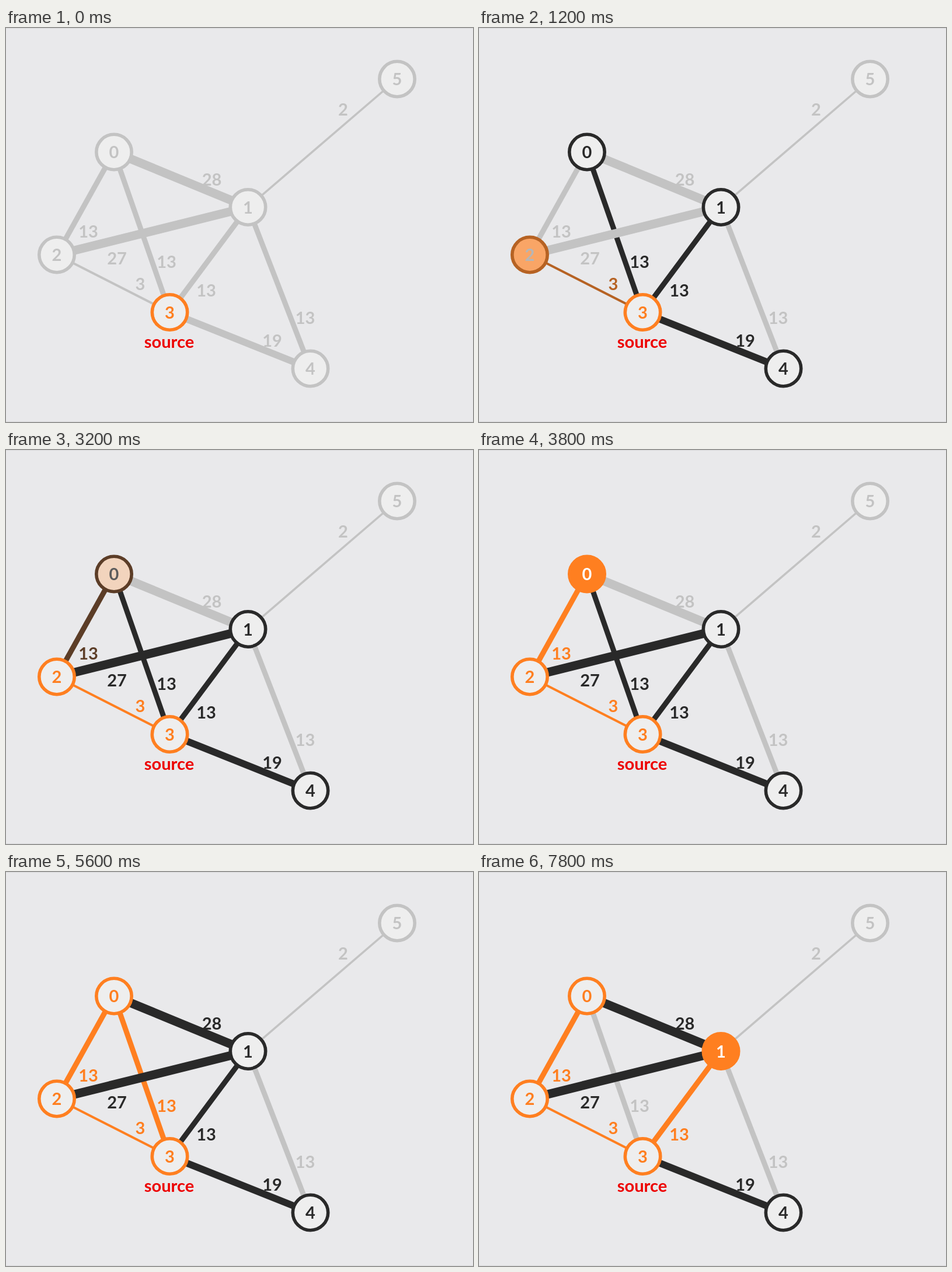
An HTML page that plays this animation: 800x675 px, repeating every 8 s.

```html
<!DOCTYPE html>
<html lang="en">
<head>
<meta charset="utf-8">
<title>Minimum spanning tree</title>
<style>
  html, body { margin: 0; width: 100%; height: 100%; overflow: hidden; background: #e9e9eb; }
  svg { display: block; width: 100vw; height: 100vh; }
  text { font: 700 29px Lato, "Open Sans", sans-serif; text-anchor: middle; }
</style>
</head>
<body>
<svg id="stage" viewBox="0 0 800 675"></svg>
<script>
const LOOP = 8000, TICK = 200, FADE = 500;
const GRAY = [195, 195, 195], DARK = [41, 41, 41], ORANGE = [255, 127, 32];
const PAPER = [238, 238, 238], WHITE = [255, 255, 255];

// Start of each step of the algorithm, in ms
const SCAN_3 = 220, TAKE_2 = 920, SCAN_2 = 2270, TAKE_0 = 3005,
      SCAN_0 = 4400, CHECK = 5100, REJECT = 5800, TAKE_1 = 6500;

// scan: turns dark, take: fills with orange, settle: only the ring stays orange
const nodes = [
  { x: 185, y: 212.5, scan: SCAN_3, take: TAKE_0, settle: SCAN_0 },
  { x: 414.5, y: 307, scan: SCAN_3, take: TAKE_1 },
  { x: 87, y: 388.5, scan: SCAN_3, take: TAKE_2, settle: SCAN_2 },
  { x: 280.5, y: 487, source: true },
  { x: 521.5, y: 583.5, scan: SCAN_3 },
  { x: 670, y: 87.5 }
];

// from, to, weight, line width, label x, label y, colour changes
const edges = [
  [0, 1, 28, 15, 352.5, 259, [[SCAN_0, DARK]]],
  [0, 2, 13, 9, 141, 348.5, [[SCAN_2, DARK], [TAKE_0, ORANGE]]],
  [0, 3, 13, 9, 275, 400.5, [[SCAN_3, DARK], [CHECK, ORANGE], [REJECT, GRAY]]],
  [1, 2, 27, 15, 190, 394, [[SCAN_2, DARK]]],
  [1, 3, 13, 9, 343, 449.5, [[SCAN_3, DARK], [TAKE_1, ORANGE]]],
  [1, 4, 13, 9, 512.5, 496, [[]]],
  [1, 5, 2, 3.6, 577.5, 139, [[]]],
  [2, 3, 3, 4, 230, 438, [[SCAN_3, DARK], [TAKE_2, ORANGE]]],
  [3, 4, 19, 12, 456, 535, [[SCAN_3, DARK]]]
];

const stage = document.getElementById("stage");
const painted = [];

function add(tag, attributes, content = "") {
  const element = document.createElementNS("http://www.w3.org/2000/svg", tag);
  for (const name in attributes) element.setAttribute(name, attributes[name]);
  element.textContent = content;
  return stage.appendChild(element);
}

function label(x, y, content, fill = "") {
  return add("text", { x, y: y + 10.5, fill }, content);
}

function animate(element, property, start, changes) {
  painted.push({ element, property, start, changes: changes.filter(c => c[0] !== undefined) });
}

function ease(p) {
  p = Math.min(1, Math.max(0, p));
  return p < 0.5 ? 4 * p ** 3 : 1 - 4 * (1 - p) ** 3;
}

function colorAt({ start, changes }, time) {
  return changes.reduce((color, [begin, next]) => {
    const p = ease((time - begin) / FADE);
    return color.map((c, i) => c + (next[i] - c) * p);
  }, start);
}

for (const y of [0, 674]) add("rect", { y, width: 800, height: 1, fill: "#dadadc" });

for (const [a, b, , width, , , changes] of edges) {
  const line = add("line", {
    x1: nodes[a].x, y1: nodes[a].y, x2: nodes[b].x, y2: nodes[b].y, "stroke-width": width
  });
  animate(line, "stroke", GRAY, changes);
}

for (const [, , weight, , x, y, changes] of edges) {
  animate(label(x, y, weight), "fill", GRAY, changes);
}

nodes.forEach(({ x, y, scan, take, settle, source }, id) => {
  const ring = add("circle", { cx: x, cy: y, r: 30.2, "stroke-width": 5.6 });
  const start = source ? ORANGE : GRAY;
  animate(ring, "stroke", start, [[scan, DARK], [take, ORANGE]]);
  animate(ring, "fill", PAPER, [[take, ORANGE], [settle, PAPER]]);
  animate(label(x, y, id), "fill", start, [[scan, DARK], [take, WHITE], [settle, ORANGE]]);
});

label(279.5, 537.5, "source", "#ed0000");

function draw(now) {
  const time = Math.floor(now % LOOP / TICK) * TICK;
  for (const part of painted) {
    part.element.setAttribute(part.property, `rgb(${colorAt(part, time).map(Math.round)})`);
  }
  requestAnimationFrame(draw);
}
draw(0);
</script>
</body>
</html>
```
